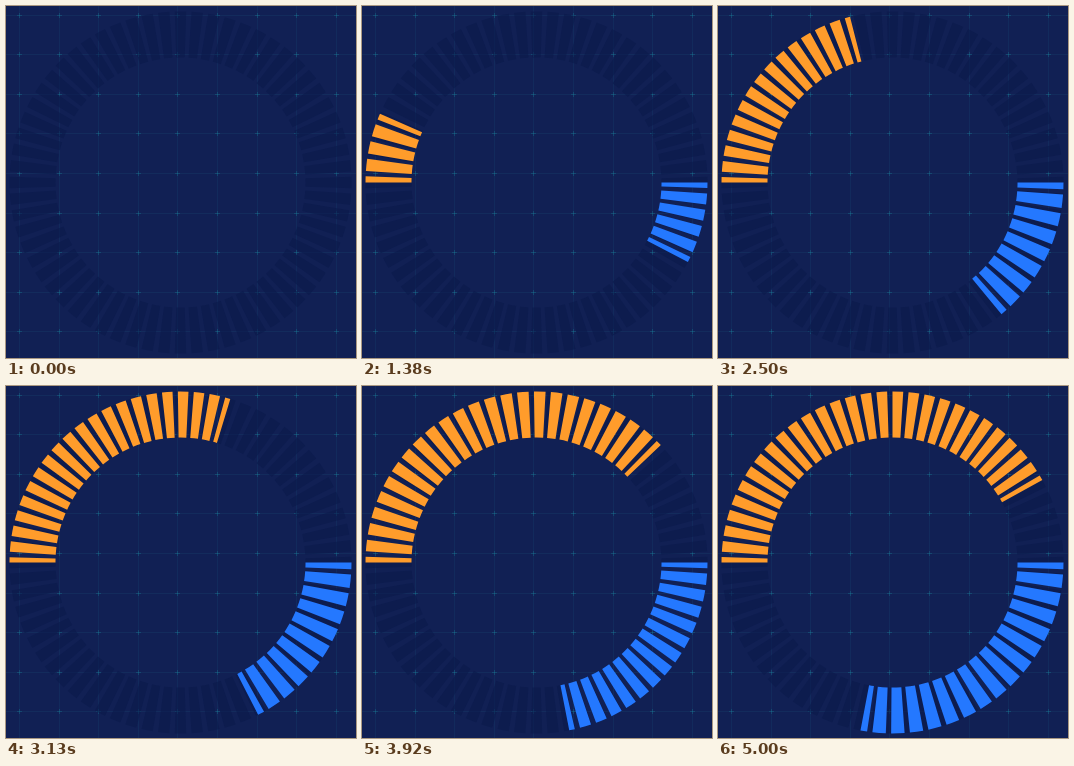
Recreate the animation shown at these times as an HTML page with a canvas. Size 350 px wide and 352 px high, loop 5.04 s.

```html
<!DOCTYPE html>
<html lang="en">
<head>
<meta charset="utf-8">
<title>Dashed ring chart</title>
<style>
  html, body { margin: 0; width: 100%; height: 100%; overflow: hidden; background: #112054; }
  canvas { display: block; width: 350px; height: 352px; }
</style>
</head>
<body>
<canvas id="stage" width="350" height="352"></canvas>
<script>
const ctx = document.getElementById('stage').getContext('2d');
const W = 350, H = 352;
const CX = 174.5, CY = 176.5, R_OUT = 171, R_IN = 125;
const LOOP = 5040, FPS = 24, STEPS = 120;
const PERIOD = 5.78, GAP = 1.79; // degrees
const GRID = 39.6, GRID_X = 13.5, GRID_Y = 9;
const RAD = Math.PI / 180;

// Cubic ease-in-out (0.42, 0, 0.58, 1), solved by bisection.
function ease(p) {
  let lo = 0, hi = 1;
  for (let i = 0; i < 30; i++) {
    const u = (lo + hi) / 2, v = 1 - u;
    if (1.26 * u * v * v + 1.74 * u * u * v + u * u * u < p) lo = u;
    else hi = u;
  }
  return lo * lo * (3 - 2 * lo);
}

function wedge(a, b) {
  ctx.moveTo(CX + R_OUT * Math.cos(a * RAD), CY + R_OUT * Math.sin(a * RAD));
  ctx.arc(CX, CY, R_OUT, a * RAD, b * RAD);
  ctx.arc(CX, CY, R_IN, b * RAD, a * RAD, true);
  ctx.closePath();
}

// The arc is halved into pieces of at most 45 degrees. Each piece holds a whole
// number of dashes; the gap is fixed and the dash length takes up the rest.
function dashedArc(start, sweep, color) {
  if (sweep <= 0) return;
  let pieces = 1;
  while (sweep / pieces > 45) pieces *= 2;
  const count = pieces * Math.max(1, Math.round(sweep / pieces / PERIOD));
  const step = sweep / count;
  const half = Math.max(step - GAP, step * 0.3) / 2;
  ctx.beginPath();
  for (let i = 0; i <= count; i++) {
    const mid = i * step;
    wedge(start + Math.max(0, mid - half), start + Math.min(sweep, mid + half));
  }
  ctx.fillStyle = color;
  ctx.fill();
}

function drawGrid() {
  ctx.fillStyle = 'rgba(30, 110, 145, 0.14)';
  for (let x = GRID_X; x < W; x += GRID) ctx.fillRect(Math.floor(x), 0, 1, H);
  for (let y = GRID_Y; y < H; y += GRID) ctx.fillRect(0, Math.floor(y), W, 1);
  ctx.fillStyle = 'rgba(28, 135, 160, 0.3)';
  for (let x = GRID_X; x < W; x += GRID) {
    for (let y = GRID_Y; y < H; y += GRID) {
      const px = Math.floor(x), py = Math.floor(y);
      ctx.fillRect(px - 2, py, 5, 1);
      ctx.fillRect(px, py - 2, 1, 5);
    }
  }
}

function draw(ms) {
  const t = Math.floor((ms % LOOP) / 10) * 10;
  const p = Math.min(1, Math.floor((t + 4.9) * FPS / 1000) / STEPS);
  ctx.fillStyle = '#112054';
  ctx.fillRect(0, 0, W, H);
  drawGrid();
  dashedArc(0, 360, 'rgba(10, 25, 76, 0.6)');
  dashedArc(180, 151.2 * ease(p), '#ff9c2b');
  dashedArc(0, 100.8 * p, '#2478ff');
}

function tick() {
  draw(performance.now());
  requestAnimationFrame(tick);
}
tick();
</script>
</body>
</html>
```
